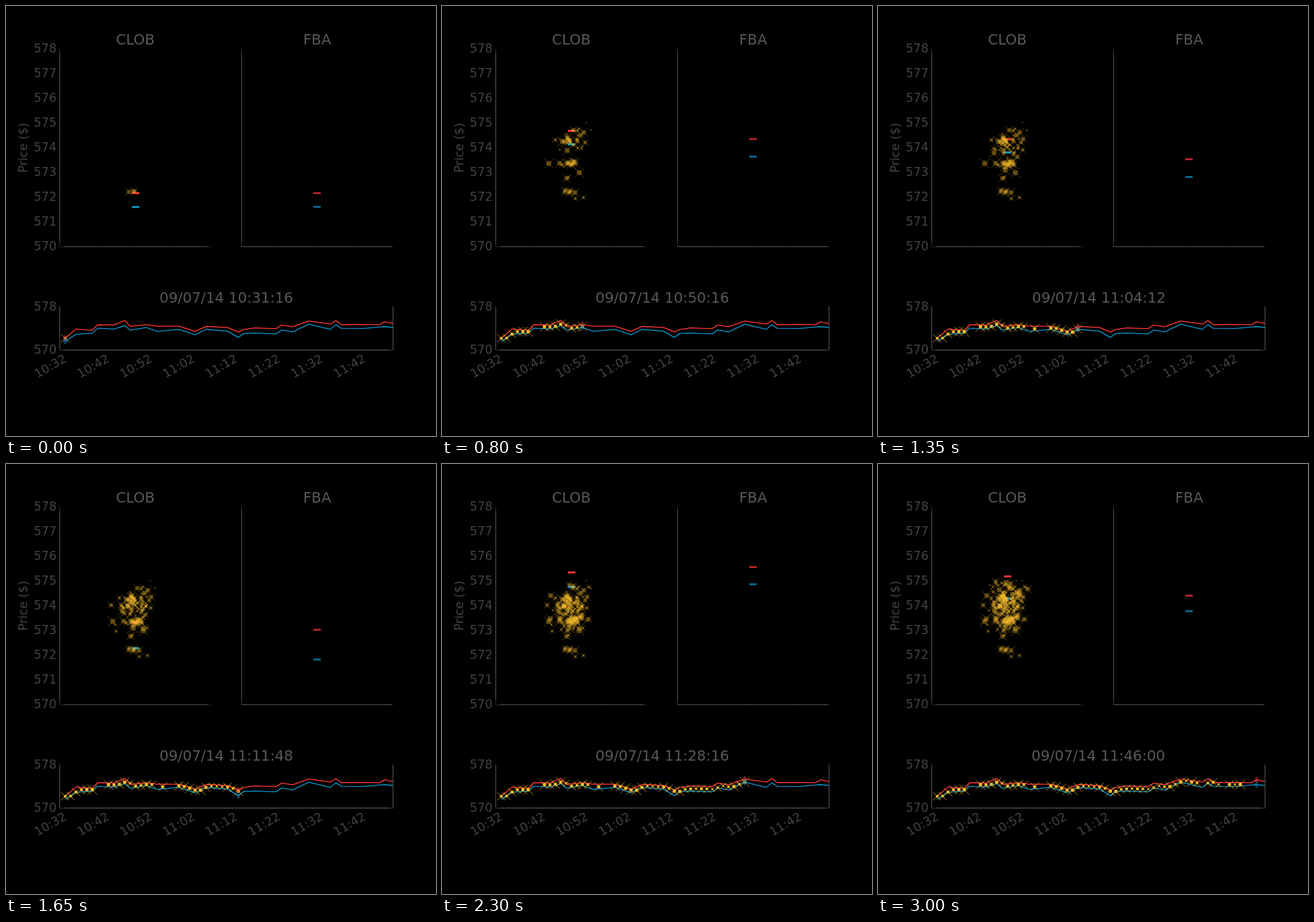
These frames come from a looping animation (748 by 748 pixels, 3050 ms). An HTML page:

```html
<!DOCTYPE html>
<html lang="en">
<head>
<meta charset="utf-8">
<title>CLOB and FBA prices</title>
<style>
  html, body { margin: 0; width: 100%; height: 100%; overflow: hidden; background: #000; }
  svg { display: block; width: 748px; height: 748px; }
  text { font: 20.83px "DejaVu Sans", sans-serif; fill: #424242; }
  .title { font-size: 25px; fill: #585858; }
  .spine { stroke: #555; stroke-width: 1.3; }
  .tick { stroke: #000; stroke-width: 1; }
  .line { fill: none; stroke-width: 1.6; stroke-linejoin: round; }
  .dot { fill: #fcc02e; }
  .cross { fill: none; stroke: #fcc02e; stroke-width: .85; }
</style>
</head>
<body>
<svg id="stage" viewBox="0 0 748 748"></svg>
<script>
const LOOP = 3050, STEP = 50, LAST = 59;
const RED = '#ff3636', BLUE = '#0a93c6';
const stage = document.getElementById('stage');

// Turning points in the lower chart: step, ask height, bid height.
const quotes = [
  [0, 577.8, 583.1], [2, 562, 571], [5, 564, 569], [6, 554.4, 560.5], [9, 554.8, 562], [11, 547, 556],
  [12, 557.3, 564], [15, 554.2, 559.3], [17, 557, 566], [21, 557, 562.5], [24, 566, 572], [26, 557.4, 562.4],
  [30, 559.3, 565.7], [32, 567, 576.7], [33, 562.8, 569.5], [35, 560, 569], [39, 561.2, 570.2],
  [40, 555, 563.5], [42, 558, 567], [45, 548, 553.5], [49, 553.3, 562.5], [50, 547.2, 554.5],
  [51, 554.4, 560.7], [55, 554, 561], [58, 554.5, 558.5], [59, 549.5, 557.9], [61, 553, 559.5]
];
// FBA quotes in the upper panel: step, ask height, bid height.
const fba = [[0, 325.5, 349.5], [6, 251, 294.5], [15, 231.5, 262], [26, 266.5, 297.5],
  [39, 236, 283.5], [51, 212.5, 244.5], [59, 229, 256]];

function at(keys, i, col) {
  const n = Math.max(1, keys.findIndex(k => k[0] >= i));
  const a = keys[n - 1], b = keys[n];
  const p = Math.max(0, (i - a[0]) / (b[0] - a[0]));
  return a[col] + (b[col] - a[col]) * p;
}
const ask = i => at(quotes, i, 1);
const bid = i => at(quotes, i, 2);
// Trades trail the middle of the spread.
const tradeY = i => Math.min(578, (ask(i - .6) + bid(i - .6)) / 2);
const stepX = i => 103 + 9.415 * i;
const panelY = y => 418 - (598 - y) * 344 / 75;

let seed = 11;
function rand() {
  seed = (seed * 16807) % 2147483647;
  return seed / 2147483647;
}
const bell = () => rand() + rand() + rand() + rand() - 2;

function add(tag, attrs, parent = stage) {
  const el = document.createElementNS('http://www.w3.org/2000/svg', tag);
  for (const k in attrs) el.setAttribute(k, attrs[k]);
  parent.appendChild(el);
  return el;
}
function label(str, x, y, anchor, extra = {}) {
  const el = add('text', { x, y, 'text-anchor': anchor, ...extra });
  el.textContent = str;
  return el;
}
const segment = (cls, x1, y1, x2, y2) => add('line', { class: cls, x1, y1, x2, y2 });

// Axes: black inner ticks cut into the grey spines.
function panel(name, left, right) {
  segment('spine', left, 74, left, 418.7);
  segment('spine', left, 418.7, right, 418.7);
  for (let k = 0; k <= 4; k++) {
    const x = left + .5 + (right - left) / 4 * k;
    segment('tick', x, 410, x, 418.5);
    segment('tick', x, 74, x, 82);
  }
  label(name, (left + right) / 2 + .2, 67, 'middle', { class: 'title' });
}
panel('CLOB', 93.5, 356);
panel('FBA', 409.7, 672.5);
for (let k = 0; k <= 8; k++) {
  const y = 418.2 - 43 * k;
  segment('tick', 93.5, y, 101, y);
  segment('tick', 350, y, 356, y);
  label(570 + k, 88, 425 - 43 * k, 'end');
}
label('Price ($)', 0, 0, 'middle', { transform: 'translate(36.5 246.5) rotate(-90)' });

for (const x of [93.5, 673.3]) segment('spine', x, 523, x, 598.5);
segment('spine', 93.5, 598.5, 673.3, 598.5);
segment('tick', 93.5, 598, 101, 598);
segment('tick', 666, 598, 673, 598);
label('578', 88, 530, 'end');
label('570', 88, 605, 'end');
for (let k = 0; k < 8; k++) {
  const m = 632 + 10 * k, x = 108.5 + 74.33 * k;
  segment('tick', x, 590, x, 598.5);
  label(Math.floor(m / 60) + ':' + String(m % 60).padStart(2, '0'), 0, 0, 'end',
    { transform: `translate(${x - 1.8} 617.5) rotate(-30)` });
}
const clock = label('', 267, 516, 'start', { class: 'title' });
const pen = document.createElement('canvas').getContext('2d');
pen.font = '25px "DejaVu Sans", sans-serif';

// Price lines.
add('rect', { x: 93, y: 515, width: 580, height: 90 }, add('clipPath', { id: 'plot' }));
const plot = add('g', { 'clip-path': 'url(#plot)' });
const trace = (col, stroke) => add('polyline',
  { class: 'line', stroke, points: quotes.map(q => stepX(q[0]) + ',' + q[col]).join(' ') }, plot);
trace(2, BLUE);
trace(1, RED);

const bar = (x, fill) => add('rect', { x, width: 13, height: 3.4, fill });
const bars = [bar(219, RED), bar(219, BLUE), bar(534.5, '#b5262a'), bar(534.5, '#066a92')];

// Trades: one group per step, shown from that step on.
function mark(g, x, y, r, reach, fill, stroke) {
  const h = r * reach;
  add('circle', { class: 'dot', cx: x, cy: y, r, opacity: fill }, g);
  add('path', {
    class: 'cross', opacity: stroke,
    d: `M${x - h} ${y - h}l${2 * h} ${2 * h}m0 ${-2 * h}l${-2 * h} ${2 * h}`
  }, g);
}
const trades = [];
for (let i = 0; i <= LAST; i++) {
  const g = add('g', {}), y = tradeY(i);
  trades.push(g);
  if (i > 56 || rand() > .88) continue;
  mark(g, stepX(i), y, 1.4 + 1.7 * Math.sqrt(rand()), 2.8, .95, .9);
  const count = 3 + Math.floor(rand() * 3);
  for (let k = 0; k < count; k++) {
    mark(g, 226 + bell() * 29, panelY(y) + bell() * 7, .6 + rand() * 4.3, 1.8, .32, .42);
  }
}

const diamond = fill => add('path', { d: 'M0-6.5L4 0L0 6.5L-4 0Z', fill, opacity: .5 });
const askNow = diamond('#e0343c'), bidNow = diamond('#0c7fae');

// FBA follows the CLOB quote with a slowly drifting gap.
const gaps = fba.map(([i, a, b]) => [i, a - panelY(ask(i)), b - panelY(bid(i))]);

let shown = -1;
function show(i) {
  if (i === shown) return;
  shown = i;
  const s = 37876 + 76 * i;
  const hms = [s / 3600, s / 60 % 60, s % 60].map(v => String(Math.floor(v)).padStart(2, '0'));
  clock.textContent = '09/07/14 ' + hms.join(':');
  // The title is centred by its ink, on whole pixels.
  const ink = pen.measureText(clock.textContent);
  clock.setAttribute('x', Math.round(383.4 - (ink.actualBoundingBoxRight - ink.actualBoundingBoxLeft) / 2));

  const a = panelY(ask(i)), b = panelY(bid(i));
  [a, b, a + at(gaps, i, 1), b + at(gaps, i, 2)].forEach((y, k) => bars[k].setAttribute('y', y - 1.7));
  trades.forEach((g, k) => { g.style.display = k <= i ? '' : 'none'; });
  askNow.setAttribute('transform', `translate(${stepX(i)} ${ask(i)})`);
  bidNow.setAttribute('transform', `translate(${stepX(i)} ${bid(i)})`);
}

const start = performance.now();
function tick() {
  const t = (performance.now() - start) % LOOP;
  show(Math.min(LAST, Math.max(0, Math.floor(t / STEP) - 1)));
  requestAnimationFrame(tick);
}
tick();
</script>
</body>
</html>
```
